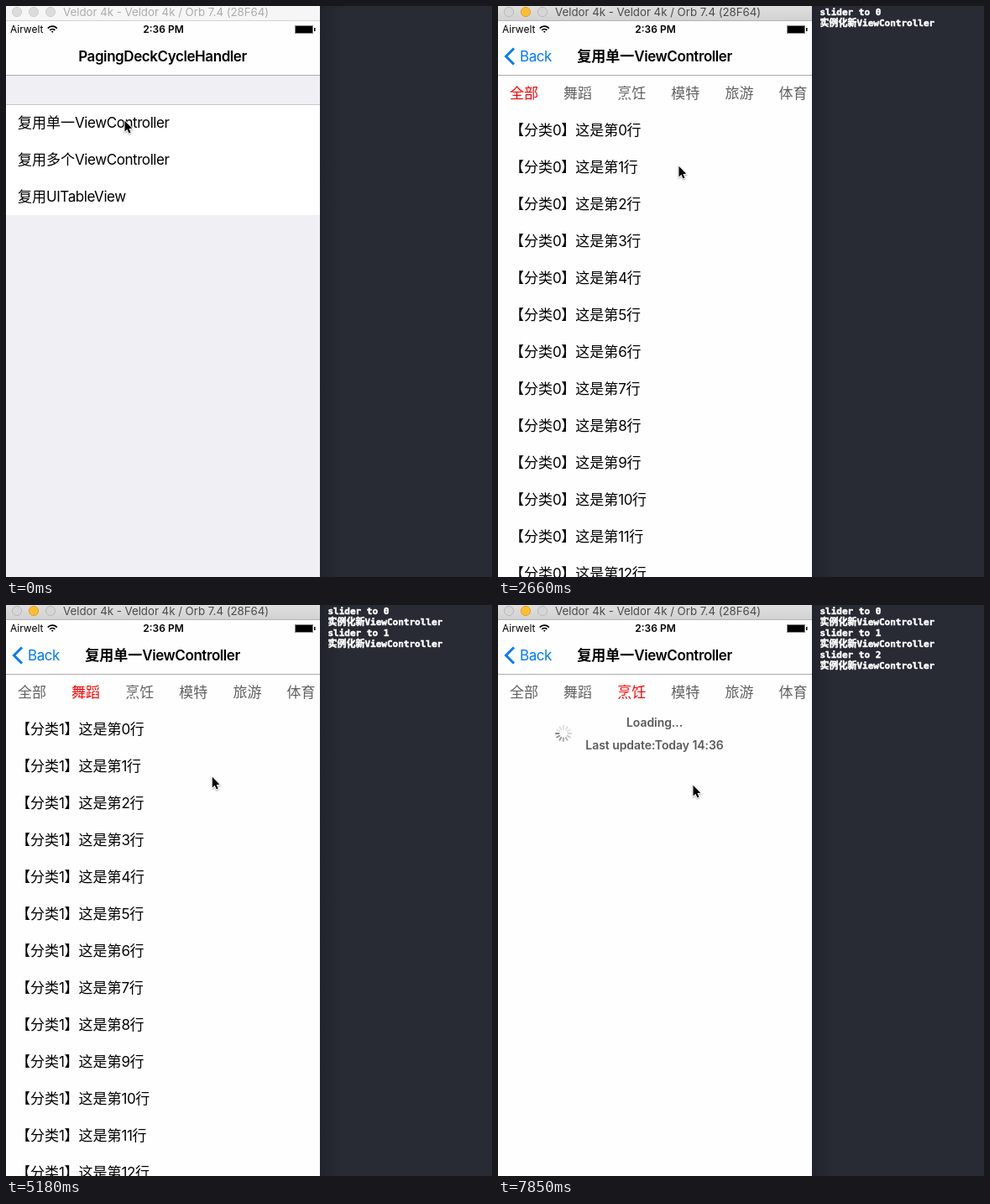
Recreate the animation shown at these times as an HTML page with a canvas. Size 579x680 px, loop 8000 ms.

```html
<!DOCTYPE html>
<html lang="zh-CN">
<head>
<meta charset="utf-8">
<title>Reusable pages demo</title>
<style>
  html, body { margin: 0; width: 100%; height: 100%; overflow: hidden; background: #282b34; }
  canvas { display: block; }
</style>
</head>
<body>
<canvas id="stage" width="579" height="680"></canvas>
<script>
const ctx = document.getElementById('stage').getContext('2d');
const LOOP = 8000, FIRST_STEP = 438, STEP = 148, LAST_STEP = 50;
const W = 374, H = 680, NAV_BOTTOM = 83, LIST_TOP = 126, ROW = 44, HEADER = 54;
const SANS = 'Inter, "Noto Sans CJK SC", "Noto Sans CJK", sans-serif';
const MONO = '"DejaVu Sans Mono", "Noto Sans CJK SC", "Noto Sans CJK", monospace';
const BLUE = '#007aff', LINE = '#c8c7cc', GROUPED = '#efeff4';
const WINDOW_TITLE = 'Veldor 4k - Veldor 4k / Orb 7.4 (28F64)';
const HOME_TITLE = 'PagingDeckCycleHandler';
const PAGE_TITLE = '复用单一ViewController';
const MENU = [PAGE_TITLE, '复用多个ViewController', '复用UITableView'];
const TABS = ['全部', '舞蹈', '烹饪', '模特', '旅游', '体育'];

const PRESS = 438, PUSH = 494;
// When each page starts refreshing and when its data arrives.
const PAGES = [
  { start: 525, end: 1878 },
  { start: 3212, end: 4592 },
  { start: 6650, end: Infinity },
];
const SCROLL = [[2740, 0], [3000, .28], [3210, 1], [5150, 1], [5450, 1.3], [5740, 1],
  [6200, 1], [6440, 1.3], [6640, 2]];
const CURSOR = [[2150, 141, 136], [2650, 215, 190], [2740, 215, 191], [3050, 107, 193],
  [3850, 107, 193], [4730, 211, 200], [5030, 247, 203], [5150, 247, 204], [5500, 119, 207],
  [5780, 119, 207], [6060, 245, 211], [6200, 245, 211], [6480, 120, 213], [6700, 120, 213],
  [7220, 232, 214]];

const clamp = v => Math.max(0, Math.min(1, v));
const ease = v => { const u = clamp(v); return u * u * (3 - 2 * u); };

function track(keys, t) {
  const next = keys.findIndex(k => k[0] > t);
  if (next < 0) return keys[keys.length - 1].slice(1);
  if (next === 0) return keys[0].slice(1);
  const a = keys[next - 1], b = keys[next];
  const u = ease((t - a[0]) / (b[0] - a[0]));
  return a.slice(1).map((v, i) => v + (b[i + 1] - v) * u);
}

function rect(x, y, w, h, color) {
  ctx.fillStyle = color;
  ctx.fillRect(x, y, w, h);
}

function clipped(x, y, w, h, draw) {
  ctx.save();
  ctx.beginPath();
  ctx.rect(x, y, w, h);
  ctx.clip();
  draw();
  ctx.restore();
}

// Latin runs are tracked tighter as the size grows; CJK runs keep full-width advances.
function text(str, x, centerY,
    { size = 17, weight = 400, color = '#000', center = false, family = SANS, outline = 0 } = {}) {
  ctx.font = `${weight} ${size}px ${family}`;
  ctx.fillStyle = ctx.strokeStyle = color;
  ctx.lineWidth = outline;
  const tracking = -.017 * (size - 12) ** 2;
  const runs = str.match(/[\u3000-\u9fff]+|[^\u3000-\u9fff]+/g).map(run => {
    const spacing = run[0] < '\u3000' && family === SANS ? `${tracking}px` : '0px';
    ctx.letterSpacing = spacing;
    return { run, spacing, width: ctx.measureText(run).width };
  });
  if (center) x -= runs.reduce((sum, r) => sum + r.width, 0) / 2;
  for (const { run, spacing, width } of runs) {
    ctx.letterSpacing = spacing;
    ctx.fillText(run, x, centerY + size * .355);
    if (outline) ctx.strokeText(run, x, centerY + size * .355);
    x += width;
  }
}

function faded(alpha, draw) {
  ctx.save();
  ctx.globalAlpha *= clamp(alpha);
  draw();
  ctx.restore();
}

function drawConsole(t) {
  rect(W, 0, 579 - W, H, '#282b34');
  const shadow = ctx.createLinearGradient(W, 0, W + 26, 0);
  shadow.addColorStop(0, 'rgba(20,22,28,.35)');
  shadow.addColorStop(1, 'rgba(20,22,28,0)');
  rect(W, 0, 26, H, shadow);
  const style = { size: 11, weight: 700, color: '#fff', family: MONO, outline: .5 };
  PAGES.forEach((page, i) => {
    if (t < page.start) return;
    text(`slider to ${i}`, 383.5, 7 + i * 26, style);
    text('实例化新ViewController', 383.5, 20 + i * 26, style);
  });
}

function drawWindowBar(active) {
  const fill = ctx.createLinearGradient(0, 0, 0, 17);
  fill.addColorStop(0, active ? '#dfdfdf' : '#f6f6f6');
  fill.addColorStop(1, active ? '#d2d2d2' : '#f6f6f6');
  rect(0, 0, W, 17, fill);
  rect(0, 17, W, 1, active ? '#b4b4b4' : '#d3d3d3');
  [13, 33, 53].forEach((x, i) => {
    const lit = active && i === 1;
    ctx.beginPath();
    ctx.arc(x, 7, 5.6, 0, 7);
    ctx.fillStyle = lit ? '#fdbe30' : active ? '#d6d6d6' : '#dcdcdc';
    ctx.strokeStyle = lit ? '#e0a128' : active ? '#b9b9b9' : '#cfcfcf';
    ctx.lineWidth = 1;
    ctx.fill();
    ctx.stroke();
  });
  text(WINDOW_TITLE, 68, 7.3, { size: 13.3, color: active ? '#4b4b4b' : '#acacac' });
}

function drawStatusBar() {
  text('Airwelt', 5, 28, { size: 12 });
  text('2:36 PM', 187.5, 28, { size: 12, weight: 600, center: true });
  ctx.strokeStyle = '#000';
  ctx.lineWidth = 1.7;
  for (const r of [1, 4.2, 7.6]) {
    ctx.beginPath();
    ctx.arc(55.3, 31.8, r, -Math.PI * .76, -Math.PI * .24);
    ctx.stroke();
  }
  ctx.strokeStyle = '#8a8a8a';
  ctx.lineWidth = 1;
  ctx.strokeRect(344.5, 23.5, 21, 9);
  rect(345, 24, 20, 8, '#000');
  rect(367, 26, 1.5, 4, '#000');
}

function drawNavBar(t, remaining) {
  rect(0, 18, W, 64, '#fefefe');
  rect(0, 82, W, 1, '#acacae');
  drawStatusBar();
  const bold = { weight: 600, center: true };
  faded(remaining, () => text(HOME_TITLE, 186.5 - 57 * (1 - remaining), 60, bold));
  if (t < PUSH) return;
  faded((t - PUSH) / 260, () => text(PAGE_TITLE, 186.5 + 322 * remaining, 60, bold));
  faded((t - 690) / 300, () => {
    ctx.beginPath();
    ctx.moveTo(19, 50.5);
    ctx.lineTo(9.5, 60);
    ctx.lineTo(19, 69.5);
    ctx.strokeStyle = BLUE;
    ctx.lineWidth = 3;
    ctx.stroke();
    text('Back', 26 + 142 * remaining, 60, { color: BLUE });
  });
}

function drawHome(pressed, progress) {
  ctx.save();
  ctx.translate(-112 * progress, 0);
  rect(0, NAV_BOTTOM, W, H, GROUPED);
  rect(0, 117, W, 1, LINE);
  rect(0, 118, W, 131, '#fff');
  if (pressed) rect(0, 117, W, 44, '#d9d9d9');
  MENU.forEach((label, i) => text(label, 14, 139 + i * ROW));
  ctx.restore();
  rect(0, NAV_BOTTOM, W, H, `rgba(0,0,0,${.1 * progress})`);
}

function drawSpinner(x, y, elapsed) {
  const head = Math.floor(elapsed / (1000 / 12)) + 7;
  ctx.lineWidth = 2;
  ctx.lineCap = 'round';
  for (let i = 0; i < 12; i++) {
    const age = (head - i + 120) % 12, angle = i * Math.PI / 6 - Math.PI / 2;
    const dx = Math.cos(angle), dy = Math.sin(angle);
    ctx.strokeStyle = `rgba(115,115,115,${Math.max(.22, .9 - age * .1)})`;
    ctx.beginPath();
    ctx.moveTo(x + dx * 5.5, y + dy * 5.5);
    ctx.lineTo(x + dx * 9, y + dy * 9);
    ctx.stroke();
  }
  ctx.lineCap = 'butt';
}

function drawPage(index, t) {
  const { start, end } = PAGES[index];
  const loaded = t >= end;
  const pull = ease((t - start) / 250) * (1 - ease((t - end) / 400));
  const offset = Math.round(HEADER * pull * 2) / 2;
  const top = LIST_TOP + offset;
  if (offset > 0) {
    const label = { size: 14, weight: 600, color: '#5a5a5a', center: true };
    const stamp = index === 0 && !loaded ? '14:30' : '14:36';
    text(loaded ? 'Pull down to refresh' : 'Loading...', 186.5, top - 39.5, label);
    text(`Last update:Today ${stamp}`, 186.5, top - 12.5, label);
    faded(loaded ? pull : 1, () => drawSpinner(78, top - 27, t - start));
  }
  if (!loaded) return;
  // Hairlines only survive the screen scaling on half-point offsets.
  const hairlines = offset % 1 !== 0;
  for (let row = 0; row < 13; row++) {
    const y = top + row * ROW;
    text(`【分类${index}】这是第${row}行`, 14, y + 22);
    if (hairlines) rect(14, Math.floor(y + ROW), W - 14, 1, LINE);
  }
}

function drawPager(t, x) {
  ctx.save();
  ctx.translate(x, 0);
  rect(0, NAV_BOTTOM, W, H, '#fefefe');
  const active = Math.max(0, PAGES.filter(p => t >= p.start).length - 1);
  TABS.forEach((tab, i) =>
    text(tab, 14 + i * 64.1, 104, { color: i === active ? '#f00' : '#606060' }));
  const [scroll] = track(SCROLL, t);
  clipped(0, LIST_TOP, W, H, () => PAGES.forEach((page, i) => {
    if (Math.abs(i - scroll) >= 1) return;
    ctx.save();
    ctx.translate(Math.round((i - scroll) * W), 0);
    drawPage(i, t);
    ctx.restore();
  }));
  ctx.restore();
}

function drawCursor(x, y) {
  ctx.save();
  ctx.translate(x + .5, y + .8);
  ctx.scale(.9, .9);
  ctx.beginPath();
  [[0, 0], [0, 14], [3.2, 11], [5.6, 16.3], [7.8, 15.3], [5.5, 10.2], [9.8, 10]]
    .forEach(p => ctx.lineTo(...p));
  ctx.closePath();
  ctx.shadowColor = 'rgba(0,0,0,.35)';
  ctx.shadowBlur = 2;
  ctx.shadowOffsetY = 1;
  ctx.strokeStyle = '#fff';
  ctx.lineWidth = 2;
  ctx.stroke();
  ctx.shadowColor = 'transparent';
  ctx.fillStyle = '#000';
  ctx.fill();
  ctx.restore();
}

function draw(t) {
  const pressed = t >= PRESS;
  const swing = Math.max(0, t - PUSH) * .0154;
  const spring = (1 + swing) * Math.exp(-swing);
  const remaining = spring < .003 ? 0 : spring;
  drawConsole(t);
  clipped(0, 0, W, H, () => {
    if (remaining > 0) drawHome(pressed, 1 - remaining);
    if (t >= PUSH) drawPager(t, Math.round(W * remaining));
    drawNavBar(t, remaining);
    drawWindowBar(pressed);
  });
  drawCursor(...track(CURSOR, t));
}

function frame(now) {
  const step = Math.min(LAST_STEP, Math.floor((now % LOOP - FIRST_STEP) / STEP));
  draw(step < 0 ? 0 : FIRST_STEP + step * STEP);
  requestAnimationFrame(frame);
}
requestAnimationFrame(frame);
</script>
</body>
</html>
```
